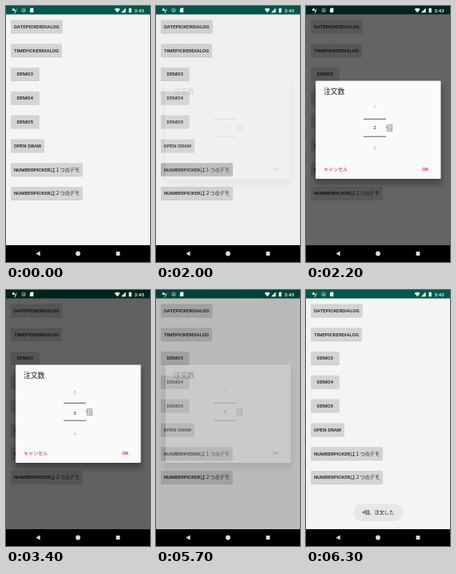
Recreate the animation shown at these times as an HTML page. Size 180 by 320 pixels, loop 8 s.

```html
<!DOCTYPE html>
<html lang="ja">
<head>
<meta charset="utf-8">
<style>
  html, body { margin: 0; height: 100%; overflow: hidden; background: #000; }
  svg { display: block; width: 100vw; height: 100vh; }
  text { font: 6.1px Roboto, "Noto Sans CJK JP", "Noto Sans CJK", sans-serif; fill: #1b1b1b; }
  .mid { text-anchor: middle; }
  .label { font-weight: 500; }
  .accent { fill: #d81b60; font-weight: 500; }
</style>
</head>
<body>
<svg viewBox="0 0 180 320">
  <defs>
    <filter id="soft" x="-20%" y="-20%" width="140%" height="150%"><feGaussianBlur stdDeviation="3.5"/></filter>
    <clipPath id="pressed"><rect x="6" y="196.2" width="90" height="16.3" rx="1"/></clipPath>
  </defs>

  <rect width="180" height="299" fill="#f4f4f2"/>
  <rect width="180" height="10.5" fill="#00574b"/>
  <g id="buttons"></g>
  <circle id="ripple" cx="52" cy="204" clip-path="url(#pressed)"/>
  <rect id="dim" width="180" height="299"/>

  <g id="status" fill="#fff">
    <circle cx="9.4" cy="4.6" r="1.5"/><circle cx="12" cy="6" r="1"/>
    <circle cx="11.3" cy="8.2" r=".7"/><circle cx="13.4" cy="3.9" r=".5"/>
    <g fill="none" stroke="#fff" opacity=".75">
      <circle cx="22" cy="5.3" r="2.3" stroke-width=".7"/><circle cx="22.4" cy="5.7" r="1" stroke-width=".7"/>
    </g>
    <path d="M31.2 2.6h3.1v5.4h-4.4v-4z"/>
    <path d="M135.7 4q3.5-2.7 7 0l-3.5 4.2z"/>
    <path d="M149.6 2.5v5.7h-5.7z"/>
    <path d="M153.6 3.1h.9v-.6h1.4v.6h.9v5.1h-3.2z"/>
    <text x="160.6" y="7.7" class="label" style="fill:#fff">3:43</text>
  </g>

  <g id="dialog">
    <rect x="10" y="98" width="160" height="125" rx="2" opacity=".3" filter="url(#soft)"/>
    <rect x="12" y="93.5" width="156.5" height="122.5" rx="1" fill="#fafaf9"/>
    <text x="22" y="110.2" style="font-size:8.75px">注文数</text>
    <g id="digits"></g>
    <path d="M72 141.3h28M72 163.2h28" stroke="#4a4a4a" stroke-width=".9"/>
    <text x="99.7" y="155.6" style="font-size:8.9px;fill:#777">個</text>
    <text x="22" y="206.3" class="accent">キャンセル</text>
    <text x="149.2" y="206.3" class="accent mid">OK</text>
  </g>

  <g id="toast">
    <rect x="59" y="267.5" width="62" height="21.5" rx="10.75" fill="#e7e7e6"/>
    <text x="90" y="280.4" class="mid">4個、注文した</text>
  </g>

  <rect y="299" width="180" height="21"/>
  <path d="M37.4 309.5l5.2-3v6z" fill="#ddd"/>
  <circle cx="90" cy="309.5" r="2.9" fill="#ddd"/>
  <rect x="137.6" y="307.1" width="4.8" height="4.8" rx=".4" fill="#ddd"/>
</svg>
<script>
const LOOP = 8000, STEP = 100, ROW = 26, CENTER = 152;
const $ = id => document.getElementById(id);
const clamp = x => Math.max(0, Math.min(1, x));
const progress = (t, from, to) => clamp((t - from) / (to - from));
const easeOut = (x, power) => 1 - (1 - x) ** power;

// Linear interpolation through [time, value] stops.
function track(t, stops) {
  let value = stops[0][1];
  for (let i = 1; i < stops.length; i++) {
    const [from] = stops[i - 1], [to, end] = stops[i];
    value += (end - stops[i - 1][1]) * progress(t, from, to);
  }
  return value;
}

function add(parent, tag, attrs, text = '') {
  const el = document.createElementNS('http://www.w3.org/2000/svg', tag);
  for (const name in attrs) el.setAttribute(name, attrs[name]);
  el.textContent = text;
  return parent.appendChild(el);
}

[
  ['DATEPICKERDIALOG', 64.5], ['TIMEPICKERDIALOG', 64], ['DEMO3', 35.5], ['DEMO4', 35.5],
  ['DEMO5', 35.5], ['OPEN DRAW', 42], ['NUMBERPICKERは１つのデモ', 90], ['NUMBERPICKERは２つのデモ', 90]
].forEach(([label, width], i) => {
  const y = 17.4 + i * 29.8, box = { x: 6, width, height: 16.3, rx: 1 };
  add($('buttons'), 'rect', { ...box, y: y + .7, fill: '#000', opacity: .17 });
  add($('buttons'), 'rect', { ...box, y, fill: '#d4d4d3' });
  add($('buttons'), 'text', { x: 6 + width / 2, y: y + 10.3, class: 'label mid' }, label);
});

const digits = [1, 2, 3, 4, 5, 6].map(n => add($('digits'), 'text', { x: 86, class: 'mid' }, n));

function draw(t) {
  const press = progress(t, 1450, 1900);
  $('ripple').setAttribute('r', 4 + 50 * easeOut(press, 2));
  $('ripple').setAttribute('opacity', track(t, [[1400, 0], [1700, .12], [2000, .12], [2300, 0]]));

  $('dim').setAttribute('opacity',
    track(t, [[2000, .02], [2100, .28], [2200, .59], [2300, .6], [5600, .6], [5700, .24], [5800, .02], [5900, 0]])
    * (t >= 2000));
  $('dialog').setAttribute('opacity',
    track(t, [[1900, 0], [2000, .12], [2100, .9], [2200, 1], [5600, 1], [5700, .25], [5800, 0]]));
  $('toast').setAttribute('opacity', easeOut(progress(t, 5800, 6300), 2));

  const value = 2 + easeOut(progress(t, 2820, 3750), 3) + easeOut(progress(t, 3730, 4550), 3);
  digits.forEach((digit, i) => {
    const offset = ROW * (i + 1 - value);
    digit.setAttribute('y', CENTER + 2.3 + offset);
    digit.setAttribute('opacity', clamp((39.4 - Math.abs(offset)) / 36.3));
  });
}

function frame(now) {
  draw(Math.floor(now % LOOP / STEP) * STEP);
  requestAnimationFrame(frame);
}
frame(performance.now());
</script>
</body>
</html>
```
